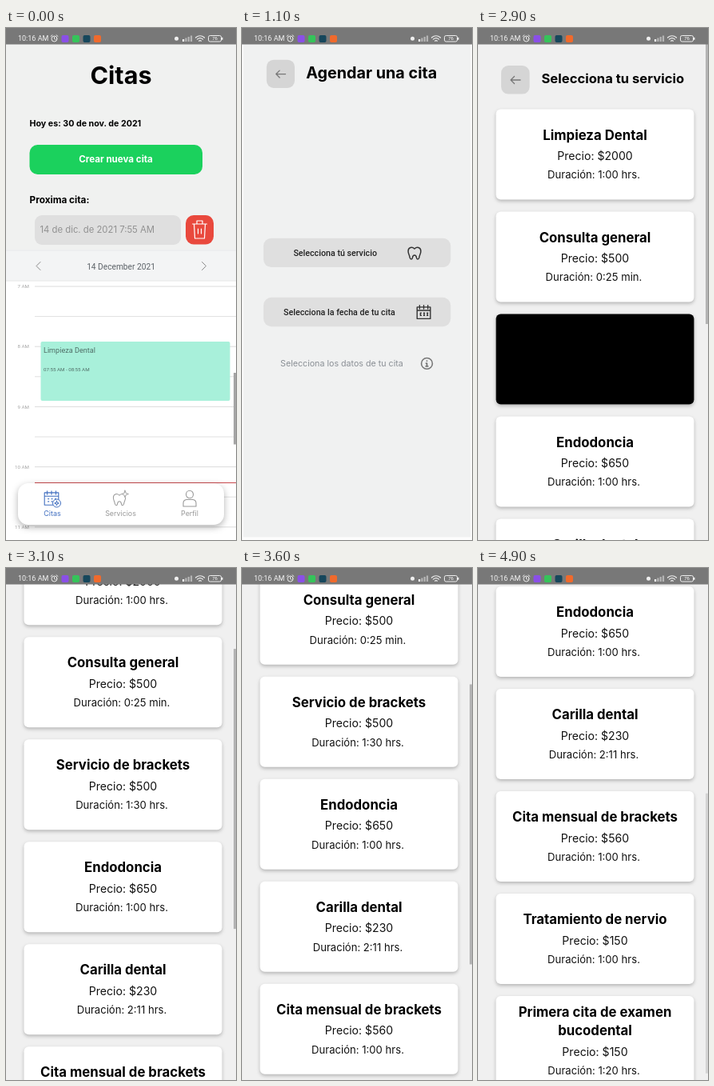
An HTML page for the animation above (5000 ms loop, 288 by 640 pixels).

```html
<!DOCTYPE html>
<html lang="es">
<head>
<meta charset="utf-8">
<title>Citas</title>
<style>
html, body { margin: 0; width: 100%; height: 100%; overflow: hidden; background: #fdfdfd; }
svg { display: block; width: 288px; height: 640px; }
text { font-family: Inter, sans-serif; }
.rb { font-family: Roboto, sans-serif; }
.card { filter: drop-shadow(0 2px 2px rgba(0, 0, 0, .25)); }
.tabs { filter: drop-shadow(0 3px 4px rgba(0, 0, 0, .3)); }
.ico { fill: none; stroke-linecap: round; stroke-linejoin: round; }
</style>
</head>
<body>
<svg id="stage" viewBox="0 0 288 640"></svg>
<script>
const LOOP = 5000;
const BG = '#f0f0f0';

// y is the optical middle of the line
const text = (x, y, size, str, attrs = '') =>
  `<text x="${x}" y="${y + size * 0.36}" font-size="${size}" ${attrs}>${str}</text>`;
const mid = (x, y, size, str, attrs = '') => text(x, y, size, str, 'text-anchor="middle" ' + attrs);
const rect = (x, y, w, h, fill, r = 0, attrs = '') =>
  `<rect x="${x}" y="${y}" width="${w}" height="${h}" rx="${r}" fill="${fill}" ${attrs}/>`;
const icon = (x, y, d, color, w = 1, scale = 1) =>
  `<path class="ico" transform="translate(${x} ${y}) scale(${scale})" d="${d}" stroke="${color}" stroke-width="${w / scale}"/>`;
const line = (x1, x2, y, color) =>
  `<path d="M${x1} ${y}H${x2}" stroke="${color}"/>`;

const BOLD = 'font-weight="700"';
const TOOTH = 'M0 -5C-3 -8 -8 -7 -8 -2C-8 2 -6 3 -6 6C-5 9 -3 9 -2.5 6C-2 2 2 2 2.5 6C3 9 5 9 6 6C6 3 8 2 8 -2C8 -7 3 -8 0 -5Z';
const CALENDAR = 'M-8 -6H8V8H-8ZM-8 -2H8M-5 -8V-4M0 -8V-4M5 -8V-4';
const DOTS = 'M-4 1H-3M0 1H1M4 1H5M-4 4H-3M0 4H1M4 4H5';
const SPARK = 'M0 -4L1 -1L4 0L1 1L0 4L-1 1L-4 0L-1 -1Z';

const backButton = (x, y) =>
  rect(x, y, 35.6, 35.6, '#d5d5d5', 9) +
  icon(x + 18, y + 18, 'M6 0H-6M-1.5 -4.5L-6 0L-1.5 4.5', '#777', 1.3);

function statusBar() {
  const bars = [3, 4.5, 6, 7.5].map((h, i) =>
    rect(221 + i * 3.3, 17 - h, 2.2, h, i < 1 ? '#fff' : '#b5b5b5')).join('');
  return rect(0, 0, 288, 20.5, '#787878') +
    text(15, 13.2, 9, '10:16 AM', 'class="rb" fill="#f4f4f4"') +
    icon(60.5, 13.5, 'M3.5 0A3.5 3.5 0 1 1 -3.5 0A3.5 3.5 0 1 1 3.5 0M0 -2V0L1.5 1M-4.5 -3L-2.5 -4.7M4.5 -3L2.5 -4.7', '#eee') +
    rect(69.5, 9, 9, 9, '#8a4fe8', 2) +
    rect(83, 9, 9, 9, '#35c45a', 2) +
    rect(96.5, 9, 9, 9, '#17475c', 2) +
    rect(110, 9, 9, 9, '#f06a2c', 2) +
    '<circle cx="213.5" cy="13.2" r="2.5" fill="#eee"/>' + bars +
    icon(243, 16.5, 'M-5.5 -4.5Q0 -9 5.5 -4.5M-3.6 -2.4Q0 -5.4 3.6 -2.4M-1.5 -.3Q0 -1.5 1.5 -.3', '#f0f0f0', 1.2) +
    rect(253.5, 9.5, 16, 7.5, 'none', 2, 'stroke="#eee"') +
    rect(270, 11.8, 1.5, 3, '#eee') +
    mid(261.5, 13.3, 6, '76', 'class="rb" fill="#fff"');
}

function homePage() {
  let grid = '';
  for (let i = 0; i < 9; i++) {
    const y = 323 + i * 37.6;
    grid += line(36, 288, y, i % 2 ? '#e0e0e0' : '#dcdcdc');
    if (i % 2 === 0) grid += text(29, y, 6.2, `${7 + i / 2} AM`, 'class="rb" text-anchor="end" fill="#a4a4a4"');
  }
  const tabs = rect(15, 569, 258, 52, '#fff', 13, 'class="tabs"') +
    icon(57, 587.5, CALENDAR + DOTS, '#416fc0', 1.1, 1.1) +
    `<circle cx="63.5" cy="594" r="5" fill="#fff" stroke="#416fc0"/>` +
    icon(63.5, 594, SPARK, '#416fc0', 1, 0.7) +
    icon(142, 589, TOOTH, '#999', 1, 0.95) +
    `<circle cx="149" cy="582.5" r="4.5" fill="#fff"/>` +
    icon(149, 582.5, SPARK, '#999', 0.9, 1.1) +
    icon(230, 588, 'M4.5 -5A4.5 4.8 0 1 1 -4.5 -5A4.5 4.8 0 1 1 4.5 -5M-8 10V6Q-8 2 -4 1.5H4Q8 2 8 6V10Z', '#999', 1.1) +
    mid(58, 606.5, 9, 'Citas', 'fill="#416fc0"') +
    mid(143.5, 606.5, 8.9, 'Servicios', 'fill="#999"') +
    mid(230, 606.5, 8.9, 'Perfil', 'fill="#999"');
  return rect(0, 0, 288, 640, '#f0f1f0') +
    mid(144, 59, 30.5, 'Citas', BOLD) +
    text(29.5, 119, 10.7, 'Hoy es: 30 de nov. de 2021', BOLD) +
    `<g id="create">${rect(29.5, 146, 216.5, 37, '#1bd15d', 10)}
      ${mid(137.5, 163.5, 11.6, 'Crear nueva cita', BOLD + ' fill="#fff"')}</g>` +
    text(29.5, 214.5, 11.8, 'Proxima cita:', BOLD) +
    rect(36, 234, 183, 37, '#dfdfdf', 9) +
    text(42.5, 251.5, 11.3, '14 de dic. de 2021 7:55 AM', 'fill="#919191"') +
    rect(225, 234, 35, 36.5, '#e9493d', 10) +
    icon(242.5, 252, 'M-9 -7H9M-3.5 -7V-11H3.5V-7M-7 -7L-6 11H6L7 -7M-2 -1V5M2 -1V5', '#fff', 1.2) +
    rect(0, 278, 288, 38, '#f3f4f5') + line(0, 288, 278, '#e8eaec') +
    icon(40.5, 297.5, 'M2.5 -5L-2.5 0L2.5 5', '#888') +
    icon(248, 297.5, 'M-2.5 -5L2.5 0L-2.5 5', '#888') +
    mid(144, 298, 10.2, '14 December 2021', 'class="rb" fill="#5c6268"') +
    rect(0, 316, 288, 324, '#fff') + line(0, 288, 316, '#e6e6e6') + grid +
    rect(43.5, 392, 237, 74, '#a8f0da', 2) +
    text(47, 403, 9.1, 'Limpieza Dental', 'class="rb" fill="#4f6d66"') +
    text(47, 426.5, 6.2, '07:55 AM - 08:55 AM', 'class="rb" fill="#4f6d66"') +
    line(36, 288, 568.5, '#c9494d') +
    rect(285, 431, 3, 89.5, '#a6a6a6', 0, 'id="homeBar"') + tabs;
}

function bookPage() {
  const row = (id, y, tx, label, extra) =>
    `<g id="${id}">${rect(25.6, y, 237, 36.8, '#dfdfdf', 10)}
      ${text(tx, y + 18.8, 10.8, label, 'class="rb" font-weight="500" fill="#222"')}${extra}</g>`;
  return rect(0, 0, 288, 640, '#f0f1f1') +
    backButton(29.5, 36.6) +
    text(79.5, 52.8, 20, 'Agendar una cita', BOLD) +
    row('service', 262, 63.5, 'Selecciona tú servicio', icon(216.8, 280.5, TOOTH, '#333', 1.5)) +
    row('date', 337, 51, 'Selecciona la fecha de tu cita',
      icon(228.5, 355.5, CALENDAR + DOTS + 'M-4 1V4M.5 1V4M4.5 1V4', '#333', 1.4, 1.05)) +
    text(47, 420, 10.8, 'Selecciona los datos de tu cita', 'fill="#8a8f95"') +
    icon(232.5, 420.5, 'M7 0A7 7 0 1 1 -7 0A7 7 0 1 1 7 0', '#777', 1.6) +
    icon(232.5, 420.5, 'M0 -3.4V-3.2M-1 -.3H0V3.5M-1.3 3.5H1.3', '#777', 1.8);
}

const SERVICES = [
  ['Limpieza Dental', '$2000', '1:00 hrs.'],
  ['Consulta general', '$500', '0:25 min.'],
  ['Servicio de brackets', '$500', '1:30 hrs.'],
  ['Endodoncia', '$650', '1:00 hrs.'],
  ['Carilla dental', '$230', '2:11 hrs.'],
  ['Cita mensual de brackets', '$560', '1:00 hrs.'],
  ['Tratamiento de nervio', '$150', '1:00 hrs.'],
  ['Primera cita de examen|bucodental', '$150', '1:20 hrs.']
];

function serviceCard([name, price, time], i) {
  const top = 101.5 + 128 * i;
  const lines = name.split('|');
  const extra = 23 * (lines.length - 1);
  const first = top + (extra ? 20 : 32);
  const titles = lines.map((s, k) => mid(146.5, first + k * 23, 16.8, s, BOLD)).join('');
  const y = first + extra;
  return `<g class="card">${rect(22.5, top, 248, 113 + extra / 2, '#fff', 6)}</g>` + titles +
    mid(146.5, y + 26.5, 14.1, 'Precio: ' + price, 'fill="#111"') +
    mid(145, y + 50, 13.1, 'Duración: ' + time, 'fill="#111"');
}

function listPage() {
  return rect(0, 0, 288, 640, BG) +
    `<g id="scroll">${backButton(29, 47)}
      ${text(79.5, 63.5, 16.6, 'Selecciona tu servicio', BOLD)}
      <g id="cards">${SERVICES.map(serviceCard).join('')}
      ${rect(22.5, 357.5, 248, 113, '#000', 6, 'id="pressed"')}</g></g>` +
    rect(285, 20, 3, 350, '#b4b4b4', 0, 'id="listBar"');
}

document.getElementById('stage').innerHTML =
  `<g id="home">${homePage()}</g><g id="book">${bookPage()}</g><g id="list">${listPage()}</g>` + statusBar();

const $ = id => document.getElementById(id);
const set = (id, name, value) => $(id).setAttribute(name, value);
const clamp = v => Math.max(0, Math.min(1, v));
const ramp = (t, from, to) => clamp((t - from) / (to - from));

// cubic-bezier(.35, .45, 0, 1), solved by bisection
function ease(x) {
  if (x <= 0 || x >= 1) return clamp(x);
  let lo = 0, hi = 1;
  for (let i = 0; i < 20; i++) {
    const s = (lo + hi) / 2;
    if (1.05 * (1 - s) ** 2 * s + s ** 3 < x) lo = s; else hi = s;
  }
  const s = lo;
  return 1.35 * (1 - s) ** 2 * s + 3 * (1 - s) * s * s + s ** 3;
}

// a page grows in from 0.85 and grows out to 1.1
function pose(id, enter, leave) {
  const scale = 0.85 + 0.15 * enter + 0.1 * leave;
  set(id, 'transform', `translate(144 320) scale(${scale}) translate(-144 -320)`);
  set(id, 'opacity', clamp(enter / 0.8) * (1 - clamp(leave / 0.8)));
  set(id, 'visibility', enter > 0 && leave < 1 ? 'visible' : 'hidden');
}

const dip = (t, start, end, depth) => {
  const m = (start + end) / 2;
  return 1 - depth * (t < m ? ramp(t, start, m) : 1 - ramp(t, m, end));
};
const fling = (t, start, dist, tau) => t < start ? 0 : dist * (1 - Math.exp((start - t) / tau));

function draw(t) {
  const toBook = ease(ramp(t, 850, 1340));
  const toList = ease(ramp(t, 1790, 2210));
  pose('home', 1, toBook);
  pose('book', toBook, toList);
  pose('list', toList, 0);

  set('homeBar', 'opacity', 1 - ramp(t, 60, 310));
  set('create', 'opacity', dip(t, 200, 520, 0.6));
  set('service', 'opacity', dip(t, 1360, 1560, 0.4));

  const loaded = t >= 2250;
  const offset = fling(t, 2930, 226, 170) + fling(t, 4000, 237, 150);
  set('scroll', 'transform', `translate(0 ${-offset})`);
  set('cards', 'display', loaded ? 'inline' : 'none');
  set('pressed', 'display', t >= 2700 && t < 2960 ? 'inline' : 'none');
  set('listBar', 'display', loaded ? 'inline' : 'none');
  set('listBar', 'y', 20 + offset * 0.566);
  set('listBar', 'opacity', 1 - 0.6 * ramp(t, 4750, 4920));
}

function tick() {
  draw(performance.now() % LOOP);
  requestAnimationFrame(tick);
}
tick();
</script>
</body>
</html>
```
